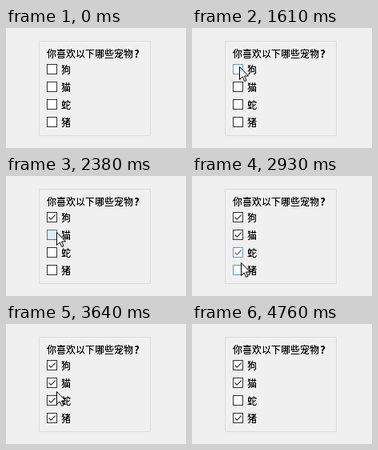
An HTML page for the animation above (5170 ms loop, 225 by 150 pixels).

```html
<!DOCTYPE html>
<html lang="zh-CN">
<head>
<meta charset="utf-8">
<title>复选框</title>
<style>
  html, body { margin: 0; width: 100%; height: 100%; overflow: hidden; background: #f0f0f0; }
  svg { display: block; width: 225px; height: 150px; }
  text { font: 12px "Noto Sans CJK SC", "Noto Sans CJK", sans-serif; fill: #000; filter: url(#crisp); }
  .mark { font-size: 13px; font-weight: bold; }
  .frame { fill: none; stroke: #dcdcdc; }
  .box { fill: #fff; stroke: #333; }
  .tick { fill: none; stroke: #333; stroke-width: 1.2; visibility: hidden; }
  .checked .tick { visibility: visible; }
  .over .box { stroke: #5b9bd0; }
  .over .tick { stroke: #4f7690; }
  .down .box { fill: #deecf8; stroke: #4a7ba8; }
  #cursor path { fill: #fff; stroke: #000; }
</style>
</head>
<body>
<svg viewBox="0 0 225 150">
  <!-- hardens the glyph edges like unsmoothed screen text -->
  <filter id="crisp">
    <feComponentTransfer><feFuncA type="linear" slope="2" intercept="-.3"/></feComponentTransfer>
  </filter>
  <rect class="frame" x="41.5" y="16.5" width="139" height="118"/>
  <text x="51" y="37">你喜欢以下哪些宠物<tspan class="mark" dx="1">?</tspan></text>
  <g id="options"></g>
  <g id="cursor"><path d="M.5 .5V16.5L4.2 12.9L6.7 18.5L9 17.5L6.5 12H11.5Z"/></g>
</svg>
<script>
  const LOOP = 5170, STEP = 70;
  const SHOW = 990, HIDE = 4760;
  const HOLD = 2; // steps the button stays pressed

  // pointer stops; at and press count steps
  const stops = [
    { at: 13, x: 46, y: -19 },
    { at: 23, x: 59, y: 48, box: 0, press: 26 },
    { at: 32, x: 63, y: 70, box: 1, press: 33 },
    { at: 38, x: 61, y: 88, box: 2, press: 39 },
    { at: 42, x: 61, y: 108, box: 3, press: 43 },
    { at: 52, x: 63, y: 84 },
    { at: 55, x: 63, y: 91, box: 2, press: 59 },
    { at: 64, x: 63, y: 102 },
    { at: 68, x: 114, y: 152 }
  ];
  for (const s of stops) s.leave = s.press ? s.press + HOLD : s.at;

  const cursor = document.getElementById('cursor');
  const options = document.getElementById('options');

  options.innerHTML = [...'狗猫蛇猪'].map((label, i) => `
    <g transform="translate(51 ${45 + 22 * i})">
      <rect class="box" x=".5" y=".5" width="12" height="12"/>
      <path class="tick" d="M2.5 6.5L5.2 9.2L10.7 3.7"/>
      <text x="18" y="12">${label}</text>
    </g>`).join('');
  const boxes = [...options.children];

  const ease = k => k * k * (3 - 2 * k);
  const mix = (a, b, k) => Math.round(a + (b - a) * k);

  function pointAt(step) {
    const from = stops.findLast(s => s.at <= step) || stops[0];
    const to = stops[stops.indexOf(from) + 1] || from;
    const span = to.at - from.leave || 1;
    const k = ease(Math.min(1, Math.max(0, (step - from.leave) / span)));
    return [mix(from.x, to.x, k), mix(from.y, to.y, k)];
  }

  function render(time) {
    const step = Math.floor((time + 10) / STEP);
    cursor.setAttribute('transform', `translate(${pointAt(step)})`);
    cursor.setAttribute('visibility', time >= SHOW && time < HIDE ? 'visible' : 'hidden');

    boxes.forEach((el, i) => {
      const visits = stops.filter(s => s.box === i);
      const toggles = visits.filter(s => step >= s.leave).length;
      el.classList.toggle('checked', toggles % 2 === 1);
      el.classList.toggle('over', visits.some(s => step >= s.at && step <= s.leave + 1));
      el.classList.toggle('down', visits.some(s => step >= s.press && step < s.leave));
    });
  }

  const start = performance.now();
  function loop() {
    render((performance.now() - start) % LOOP);
    requestAnimationFrame(loop);
  }
  loop();
</script>
</body>
</html>
```
